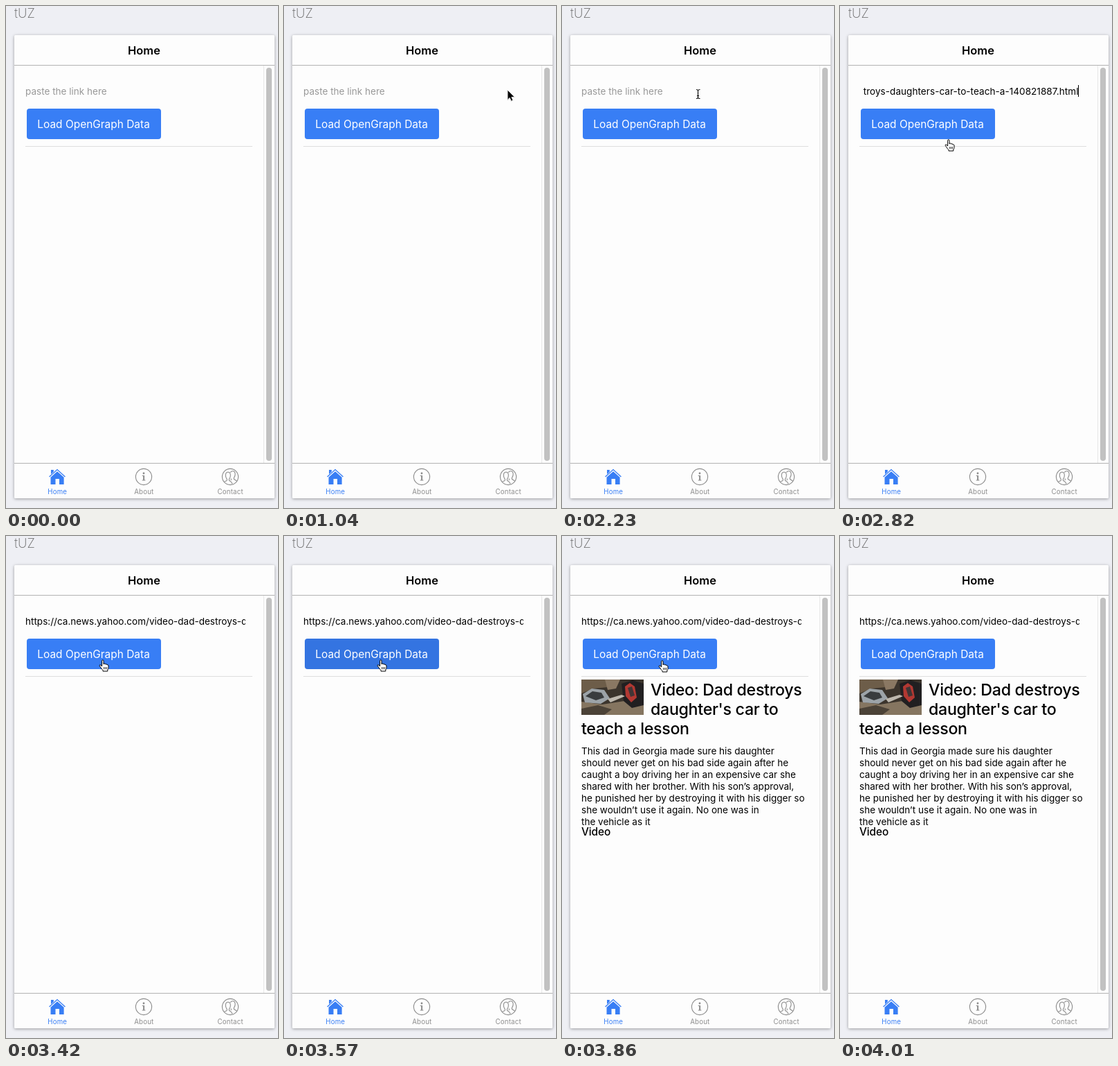
An HTML page for the animation above (8 s loop, 393 by 724 pixels).

```html
<!DOCTYPE html>
<html lang="en">
<head>
<meta charset="utf-8">
<title>Link preview demo</title>
<style>
  html, body { margin: 0; width: 100%; height: 100%; overflow: hidden; background: #eeeff4; }
  svg { display: block; width: 393px; height: 724px; }
  text { font-family: Inter, Roboto, "Open Sans", sans-serif; white-space: pre; }
  .card { fill: #fdfdfd; filter: drop-shadow(0 1px 2px rgba(0, 0, 0, .36)); }
  .platform { font-size: 18.5px; font-weight: 200; fill: #666; }
  .title { font-size: 16.45px; font-weight: 600; text-anchor: middle; }
  .field, .body { font-size: 13.54px; }
  .button { font-size: 15.45px; fill: #fff; }
  .heading { font-size: 23.2px; font-weight: 500; letter-spacing: -.3px; }
  .site { font-size: 15.4px; font-weight: 500; letter-spacing: -.1px; }
  .tab { font-size: 9.67px; letter-spacing: .2px; text-anchor: middle; fill: #8c8c8c; }
  .tab.on { fill: #387ef5; }
  .icon { fill: none; stroke: #8c8c8c; stroke-width: 1.1; }
</style>
</head>
<body>
<svg viewBox="0 0 393 724">
  <defs>
    <clipPath id="fieldClip"><rect x="28" y="110" width="318" height="26"/></clipPath>
    <clipPath id="photoClip"><rect x="28" y="207" width="90" height="51"/></clipPath>
  </defs>

  <rect width="393" height="724" fill="#eeeff4"/>
  <text class="platform" x="12" y="17">tUZ</text>
  <rect class="card" x="12" y="42" width="376" height="668" rx="1.5"/>

  <!-- header and scrollbar -->
  <text class="title" x="199.5" y="70">Home</text>
  <rect x="12" y="85" width="376" height="1" fill="#b3b3b3"/>
  <rect x="372" y="86" width="1" height="573" fill="#e7e7e7"/>
  <rect x="376" y="89" width="8" height="567" rx="4" fill="#c1c1c1"/>

  <!-- form -->
  <g clip-path="url(#fieldClip)">
    <text id="hint" class="field" x="28" y="128" fill="#999">paste the link here</text>
    <text id="urlTail" class="field" x="344.5" y="128" text-anchor="end" letter-spacing=".05">troys-daughters-car-to-teach-a-140821887.html</text>
    <text id="urlHead" class="field" x="28" y="128">https://ca.news.yahoo.com/video-dad-destroys-daughters-car</text>
  </g>
  <rect id="caret" y="114" width="1" height="17"/>
  <rect id="button" x="30" y="148" width="194" height="44" rx="4"/>
  <text class="button" x="45.3" y="176">Load OpenGraph Data</text>
  <rect x="28" y="202" width="328" height="1" fill="#dedede"/>

  <!-- loaded preview -->
  <g id="preview">
    <g clip-path="url(#photoClip)">
      <rect x="28" y="207" width="90" height="51" fill="#3b342c"/>
      <path d="M28 207h46l-8 11-20 2-18 7z" fill="#6d5d49"/>
      <path d="M62 207h22l-6 13-12 2z" fill="#8a7863"/>
      <path d="M28 239l30 4 32-5 28 6v14H28z" fill="#857560"/>
      <path d="M30 228l13-8 18 2 8 12-13 8-23-2z" fill="#9ca3a8"/>
      <path d="M34 231l10-7 13 2 4 7-12 4z" fill="#393c3e"/>
      <path d="M28 249l24-5 20 6-11 8H28z" fill="#4b4237"/>
      <path d="M86 213l16-5 16 5v31l-17 4-12-10z" fill="#211f21"/>
      <path d="M91 217l7-5 7 5 3 16-8 7-8-9z" fill="#b23832"/>
      <path d="M95 219l6-2 4 13-6 2z" fill="#413536"/>
      <path d="M66 235l20-6 5 2-21 9z" fill="#beb8ae"/>
    </g>
    <g id="heading"></g>
    <g id="body"></g>
    <text class="site" x="28" y="432">Video</text>
  </g>

  <!-- tab bar -->
  <rect x="12" y="659" width="376" height="1" fill="#b3b3b3"/>
  <g fill="#387ef5">
    <path d="M62.6 679L74 668.6 85.4 679" fill="none" stroke="#387ef5" stroke-width="1.4"/>
    <path d="M65 669h3.8v2.8l-3.8 3.5z"/>
    <path d="M74 671.2l9.6 8.6V690H77v-8h-5.5v8h-7v-10.2z"/>
  </g>
  <circle class="icon" cx="199" cy="679" r="11.6"/>
  <circle cx="199" cy="674" r="1.4" fill="#8c8c8c"/>
  <path d="M196.7 677h3.4v6.6h1.3v.9h-4.7v-.9h1.4v-5.7h-1.4z" fill="#8c8c8c"/>
  <g class="icon">
    <circle cx="324" cy="679" r="11.6"/>
    <path d="M315.4 686.4c1.4-1.3 3.6-1.3 3.9-2.6.3-1.1-.2-1.7-.8-2.6-.9-1.4-1.2-2.7-1.2-4.3 0-2.6 1.2-4.6 3.5-4.6s3.5 2 3.5 4.6c0 1.6-.3 2.9-1.2 4.3-.6.9-1.1 1.5-.8 2.6.4 1.8 4.2 1.2 4.6 5.6"/>
    <path d="M324.2 672.8c.8-1.5 1.9-2.1 3.3-2.1 2.4 0 3.6 2 3.6 4.5 0 1.6-.4 2.9-1.2 4.2-.6.9-1 1.7-.6 2.6.6 1.5 2.8 1.4 3.8 3M325 681.5c.8 1.3.2 2.1 0 2.6"/>
  </g>
  <text class="tab on" x="74.2" y="704">Home</text>
  <text class="tab" x="199.3" y="704">About</text>
  <text class="tab" x="324.2" y="704">Contact</text>

  <!-- pointers, each with its origin at the top left of its box -->
  <g id="arrow">
    <path d="M2 1v14.4l3.2-3 2 4.8 2.6-1.1-2-4.7h4.4z" fill="#000" stroke="#fff" stroke-width=".9"
      style="filter:drop-shadow(0 .7px .6px rgba(0,0,0,.35))"/>
  </g>
  <g id="beam" fill="none" stroke="#000" stroke-width="1.1">
    <path d="M1 1.5q2 0 2.5 1.2Q4 1.5 6.5 1.5M1 14.5q2 0 2.5-1.2Q4 14.5 6.5 14.5M3.5 2.5v11M2 10.5h3"/>
  </g>
  <g id="hand" stroke="#000" stroke-linejoin="round">
    <path d="M4.6 10V2.2Q4.6.8 5.8.8T7 2.2v4.6Q7.2 6 8.3 6t1.3 1.2q.2-.6 1.2-.5T12 8q.3-.5 1-.3t1 1.3v3.5q0 1-1.2 2.5v2H6v-1.4Q4 13.5 3 11.8L1.2 9.3Q.8 8.3 1.8 7.9T4.6 10z" fill="#fff"/>
    <path d="M7.6 11v3.2M9.6 11v3.2M11.6 11v3.2" fill="none" stroke-width=".8"/>
  </g>
</svg>
<script>
  const LOOP = 8000;
  const $ = id => document.getElementById(id);
  const show = (id, on) => $(id).setAttribute("visibility", on ? "visible" : "hidden");

  function addLines(id, lines, y, step, indent) {
    lines.forEach((line, i) => {
      const el = document.createElementNS("http://www.w3.org/2000/svg", "text");
      el.setAttribute("class", id);
      el.setAttribute("x", indent(i));
      el.setAttribute("y", y + i * step);
      el.textContent = line;
      $(id).append(el);
    });
  }

  addLines("heading", ["Video: Dad destroys", "daughter's car to", "teach a lesson"],
    230, 28, i => i < 2 ? 128 : 28);
  addLines("body", [
    "This dad in Georgia made sure his daughter",
    "should never get on his bad side again after he",
    "caught a boy driving her in an expensive car she",
    "shared with her brother. With his son’s approval,",
    "he punished her by destroying it with his digger so",
    "she wouldn’t use it again. No one was in",
    "the vehicle as it"
  ], 315, 17, () => 28);

  // Pointer stops: start time, shape, x, y
  const stops = [
    [0, ""],
    [1040, "arrow", 321, 120],
    [1190, "arrow", 234, 118],
    [1640, "beam", 193, 119],
    [2670, "hand", 158, 182],
    [2820, "hand", 151, 192],
    [2970, "hand", 134, 179],
    [3270, "hand", 134, 178],
    [3860, "hand", 139, 179],
    [4010, ""]
  ];

  function draw(t) {
    const within = (a, b) => t >= a && t < b;
    const [, shape, x, y] = stops.filter(s => s[0] <= t).pop();
    for (const id of ["arrow", "beam", "hand"]) show(id, id === shape);
    if (shape) $(shape).setAttribute("transform", `translate(${x} ${y})`);

    show("hint", t < 2520);
    show("urlTail", within(2520, 3420));
    show("urlHead", t >= 3420);
    show("caret", within(1780, 2230) || within(2520, 2970));
    $("caret").setAttribute("x", t < 2520 ? 28 : 344);
    $("button").setAttribute("fill", within(3570, 3710) ? "#3474e1" : "#387ef5");
    show("preview", t >= 3860);
  }

  const start = performance.now();
  function tick() {
    draw((performance.now() - start) % LOOP);
    requestAnimationFrame(tick);
  }
  tick();
</script>
</body>
</html>
```
